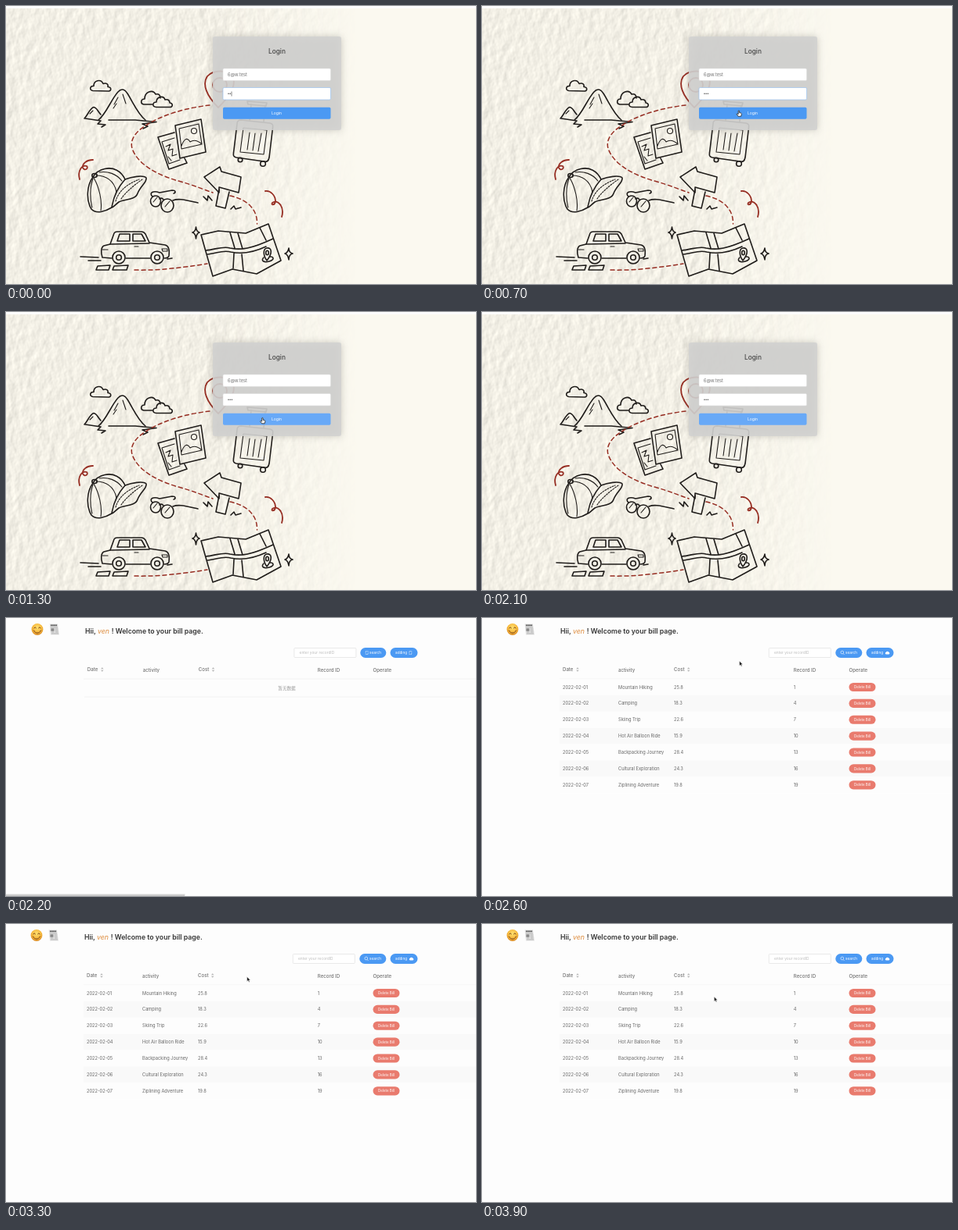
An HTML page for the animation above (4000 ms loop, 600 by 356 pixels).

```html
<!DOCTYPE html>
<html lang="en">
<head>
<meta charset="utf-8">
<title>Login and bill page</title>
<style>
html, body { margin: 0; width: 100%; height: 100%; overflow: hidden; background: #fdfdfd; }
svg { display: block; width: 600px; height: 356px; }
text { font-family: Inter, "Noto Sans", sans-serif; }
.ink { fill: none; stroke: #1f1c1a; stroke-width: 1.6; stroke-linecap: round; stroke-linejoin: round; }
.thin { stroke-width: 1.1; }
.red { stroke: #962d22; stroke-width: 1.8; }
.dash { stroke-dasharray: 5 4; stroke-width: 1.5; }
.field { fill: #fff; stroke: #dcdcdc; stroke-width: .6; }
.head { font-size: 6.1px; font-weight: 500; fill: #737373; }
.cell { font-size: 5.7px; fill: #666; }
.tiny { font-size: 4.7px; fill: #fff; }
.mid { text-anchor: middle; }
</style>
</head>
<body>
<svg viewBox="0 0 600 356" xmlns="http://www.w3.org/2000/svg">
<defs>
  <filter id="paper" x="0" y="0" width="100%" height="100%" color-interpolation-filters="sRGB">
    <feTurbulence type="fractalNoise" baseFrequency=".1 .075" numOctaves="3" seed="8"/>
    <feDiffuseLighting surfaceScale=".5" diffuseConstant="1.14" lighting-color="#f3f0e6">
      <feDistantLight azimuth="205" elevation="61"/>
    </feDiffuseLighting>
  </filter>
  <filter id="shade" x="-20%" y="-20%" width="140%" height="140%"><feGaussianBlur stdDeviation="5"/></filter>
  <linearGradient id="fade">
    <stop offset=".6" stop-color="#fff"/><stop offset="1" stop-color="#fff" stop-opacity="0"/>
  </linearGradient>
  <mask id="left"><rect width="450" height="356" fill="url(#fade)"/></mask>
  <radialGradient id="sun" cx=".5" cy=".35" r=".65">
    <stop offset="0" stop-color="#ffe273"/><stop offset=".6" stop-color="#f6b93e"/><stop offset="1" stop-color="#d98a25"/>
  </radialGradient>
</defs>

<g id="login">
  <rect width="600" height="356" fill="#fbf9f0"/>
  <g mask="url(#left)"><rect width="450" height="356" filter="url(#paper)"/></g>
  <rect width="600" height="3" fill="#fdfdfd"/>

  <g class="ink">
    <!-- clouds and mountains -->
    <path d="M111 108.500C106 108 107 102 112 102.500C112 95 121 93 124 99.500C128 98 131 100 130 103.500C135 104 135 109 130 109Z"/>
    <path d="M187 126H176C171 125 172 119 177 119C177 110 187 106 191 113C195 112 197 114 197 118"/>
    <path d="M192 129.500C186 129 187 123 192 123C192 116 201 114 203 120C207 119 209 121 209 124C214 125 213 130 208 129.500Z"/>
    <path d="M118 146C128 138 134 120 143 110C147 105.500 151 106 155 112C162 123 168 138 178 146"/>
    <path d="M100 144C105 139 107 131 112 129.500C116 130 117 135 121 139"/>
    <path d="M101 144L121 147L117 151L127 152L122 155M131 146L165 146L192 148.500L174 151L181 154L175 157"/>
    <path class="thin" d="M138 126L143 117M137 131L141 125M149 113L153 125M107 138L111 134"/>
    <!-- photos -->
    <path d="M215 162L194 168L208 209L231 201L228 195M216 153L249 145L255 187L222 195Z"/>
    <path class="thin" d="M215 169L199 174L208 202L222 197M221 157L246 151L250 177L224 183ZM224 179C227 171 231 167 235 174C238 172 243 171 249 176"/>
    <circle class="thin" cx="240" cy="160" r="3.500"/>
    <path class="thin" d="M204 180L210 177L207 185L213 183L212 192L218 190M207 193L211 198"/>
    <!-- suitcase -->
    <path d="M311 146L313 126M329 148L331 127M308 122L333 124L332 128L309 126Z"/>
    <path d="M300 146L337 150C341 151 341 153 340.500 156L336 194C335 199 333 200 329 199L294 194C290 193 290 191 290.500 188L295 151C295 148 297 146 300 146Z"/>
    <path class="thin" d="M303 156L333 159L329 190L299 187ZM311 162L308 184M318 163L315 185M326 163L322 186"/>
    <circle cx="299" cy="197" r="2.800"/><circle cx="328" cy="202" r="3.300"/>
    <!-- cap -->
    <path d="M111 219C103 230 102 249 109 260C115 267 127 263 135 258C137 245 143 232 152 222C147 211 137 206 126 208.500C119 210 114 214 111 219"/>
    <path d="M152 222C160 219 175 216 179 220C180 226 172 230 168 240C165 249 150 247 144 251C140 254 137 258 135 258"/>
    <path class="thin" d="M115 217C127 217 138 223 141 238M112 220C119 232 123 250 121 262M111 221C107 232 107 247 110 258M119 213C130 211 141 215 148 224"/>
    <path class="thin" stroke-dasharray="2 1.500" d="M140 250C143 239 152 229 170 222M147 247C152 239 164 229 174 222"/>
    <ellipse cx="113" cy="217" rx="3.200" ry="2.500"/>
    <!-- glasses -->
    <ellipse cx="191" cy="250" rx="6.500" ry="7"/><ellipse cx="206" cy="255.500" rx="8" ry="8.500"/>
    <path d="M196 247Q199 245 201 248M187 244C182 239 188 236 196 239L212 236C217 236 217 239 214 240M213 249C220 246 227 248 245 252"/>
    <path class="thin" d="M188 251L193 245M203 257L209 250"/>
    <!-- signpost -->
    <path d="M253 219L273 206L275 212L300 219L297 239L272 232L272 239Z"/>
    <path d="M272 235L268 256L280 259L285 238M252 244L257 249L258 243L263 249M287 260L291 256L293 260L300 258"/>
    <!-- car -->
    <path d="M135 323L123 322C121 316 121 309 125 307L133 305L138 291Q139 289 142 289L173 289Q176 289 178 292L183 303L203 306C208 307 209 312 208 320Q207 323 202 323M153 323H184"/>
    <path d="M133 305L183 304"/>
    <path d="M145 292H158V301H142ZM162 292H173L178 301H162Z"/>
    <circle cx="144" cy="322" r="8"/><circle cx="144" cy="322" r="3.300"/>
    <circle cx="193" cy="322" r="8"/><circle cx="193" cy="322" r="3.300"/>
    <path class="thin" d="M123 312H130M199 311H206V314H200ZM164 308H169"/>
    <path d="M95 321L118 322M105 326L121 326M206 324L212 323"/>
    <path d="M117 333L133 332L131 338L115 338ZM138 333L156 332L154 338L136 338Z"/>
    <!-- map -->
    <path d="M249 293L271 288L306 291L335 279L351 326L320 343L289 337L264 346Z"/>
    <path d="M255 313C267 312 277 307 286 310C300 313 313 311 341 298M257 318C268 317 277 312 287 315C301 318 315 316 332 308M286 290L292 310M296 291L302 311M291 317L290 336M301 318L303 339M324 284L332 300"/>
    <path d="M333 326C328 319 328 311 333 310C339 309 341 316 333 326"/>
    <ellipse cx="333.500" cy="316" rx="1.800" ry="2.800"/><path d="M329 322C325 326 329 329 336 327C343 325 342 321 337 321"/>
    <path d="M242.500 283Q243 289 247 290Q243 291 242.500 298Q242 291 238 290Q242 289 242.500 283ZM361 310Q361 316 366 317Q361 318 361 325Q360 318 356 317Q360 316 361 310Z"/>
    <!-- route -->
    <path class="red" d="M271 130C256 115 250 100 257 90C264 82 283 80 290 92C294 103 284 117 271 130M264 101a9 9 0 1 0 18 0a9 9 0 1 0-18 0"/>
    <path class="red dash" d="M260 127C232 130 200 139 180 152C163 162 157 174 162 185C170 204 195 217 220 224C238 229 250 234 264 239"/>
    <path class="red dash" d="M286 243C305 247 321 258 320.500 279"/>
    <path class="red dash" d="M164 338C195 339 225 335 257 330"/>
    <path class="red" d="M111 197C103 197 97 202 98 207C100 212 106 208 103 205C97 203 91 211 94 222"/>
    <path class="red" d="M331 237C338 236 344 243 344 250C343 256 338 255 340 252C346 247 356 256 352 270"/>
  </g>

  <rect x="264" y="39" width="164" height="120" rx="3" fill="#77756f" opacity=".36" filter="url(#shade)"/>
  <rect x="264" y="39" width="164" height="120" rx="3" fill="#d2d2d1" opacity=".88"/>
  <text class="mid" x="346" y="61" font-size="8.300" font-weight="500" fill="#464646">Login</text>
  <rect class="field" x="277" y="80" width="137.500" height="15.500" rx="1.500"/>
  <text x="283" y="89.700" font-size="5.700" fill="#747474">6@w.test</text>
  <rect class="field" id="pass" x="277" y="104.500" width="137.500" height="15.500" rx="1.500"/>
  <g fill="#555"><circle cx="284" cy="112.300" r=".8"/><circle cx="286.200" cy="112.300" r=".8"/><circle id="dot" cx="288.400" cy="112.300" r=".8"/></g>
  <path id="caret" d="M0 109.500V115.500" stroke="#333" stroke-width=".6"/>
  <rect id="go" x="277" y="129.700" width="137.500" height="15" rx="1.800"/>
  <text class="mid" x="345.500" y="139" font-size="5" fill="#fff">Login</text>
</g>

<g id="bill">
  <rect width="600" height="356" fill="#fdfdfd"/>
  <g id="top">
    <circle cx="39" cy="14.500" r="7.400" fill="url(#sun)"/>
    <path d="M34.500 16C36.500 20.300 41.500 20.300 43.500 16M34.800 12.800Q36.200 10.700 37.500 12.800M40.500 12.800Q41.800 10.700 43.200 12.800" fill="none" stroke="#7a4416" stroke-width="1" stroke-linecap="round"/>
    <path d="M54.500 7.500H65L67 21.500H56Z" fill="#e3e3e3"/>
    <path d="M56 9.300H64.500" stroke="#555" stroke-width="1.700" stroke-dasharray="1.700 .4"/>
    <path d="M56 12H65M61.500 14H65.300M61.500 16H65.500M57 18H60.500M57 20H66M62 18H65.700" stroke="#a6a6a6" stroke-width=".8"/>
    <rect x="56.400" y="13.300" width="4" height="3.500" fill="#888"/>
    <g font-size="8.750" font-weight="600" fill="#353535">
      <text x="100" y="19.700">Hii,</text>
      <text x="116" y="19.700" font-style="italic" font-weight="400" fill="#dd8a3a">ven</text>
      <text x="133.700" y="19.700">! Welcome to your bill page.</text>
    </g>
  </g>
  <g id="query">
    <rect class="field" x="366.300" y="38.500" width="79" height="12" rx="1"/>
    <text x="373" y="46.200" font-size="4.850" fill="#bcbcbc">enter your recordID</text>
  </g>
  <rect id="find" x="451.300" y="38" height="13" rx="6.500" fill="#4b99f3"/>
  <rect x="490.500" y="38" width="35" height="13" rx="6.500" fill="#4b99f3"/>
  <text class="tiny" x="464" y="46.100">search</text>
  <text class="tiny" x="497" y="46.100">adding</text>
  <g id="icons">
    <path d="M461.300 45.600L462.600 47" stroke="#fff" stroke-width=".6"/>
    <circle cx="459.800" cy="44" r="1.900" fill="none" stroke="#fff" stroke-width=".6"/>
    <path d="M515.800 46.500a1.400 1.400 0 0 1 0-2.700a1.900 1.900 0 0 1 3.500 0a1.400 1.400 0 0 1 0 2.700Z" fill="#fff"/>
  </g>
  <path id="boxes" d="M459.200 42.500h3v4h-3ZM514.800 42.500h3v4h-3Z" fill="none" stroke="#fff" stroke-width=".6" stroke-dasharray="1 .4"/>
  <g id="heads">
    <text class="head" x="103" y="68">Date</text>
    <text class="head" x="174" y="69">activity</text>
    <text class="head" x="245" y="68">Cost</text>
    <path d="M120.200 65.300h3.600l-1.800-2ZM120.200 66.700h3.600l-1.800 2ZM261.900 65.300h3.600l-1.800-2ZM261.900 66.700h3.600l-1.800 2Z" fill="#b5b5b5"/>
  </g>
  <text class="head" x="397.800" y="69">Record ID</text>
  <text class="head" x="468.600" y="69">Operate</text>
  <path d="M99 78H600" stroke="#efefef" stroke-width=".8"/>
  <g id="empty">
    <path d="M100 101H600" stroke="#efefef" stroke-width=".8"/>
    <text class="mid" lang="zh-CN" x="358.500" y="92" font-size="5.600" fill="#9a9a9a" style="font-family:'Noto Sans CJK SC','Noto Sans CJK',sans-serif">暂无数据</text>
    <rect y="353" width="229" height="3" rx="1" fill="#ececec"/>
    <rect y="354.200" width="228" height="1.800" fill="#c9c9c9"/>
  </g>
  <g id="rows"></g>
</g>

<path id="arrow" d="M0 0V6.200L1.500 4.900L2.500 7L3.600 6.500L2.600 4.500H4.500Z" fill="#222" stroke="#fff" stroke-width=".5"/>
<path id="hand" d="M-.8-3.200Q0-4 .6-3.200V-.8L2.600-.4Q3.600 0 3.300 1.200L2.700 3.800H-.9L-2.800 1.200Q-2.800 .2-1.900 .4L-.8 1.200Z" fill="#fff" stroke="#222" stroke-width=".8" stroke-linejoin="round"/>
</svg>
<script>
const LOOP = 4000, CUT = 2200, LOADED = 2400;
const $ = id => document.getElementById(id);
const show = (id, on) => $(id).setAttribute("display", on ? "inline" : "none");
const put = (id, x, y) => $(id).setAttribute("transform", `translate(${x} ${y})`);
const clamp = v => Math.max(0, Math.min(1, v));
const ease = (t, a, b) => { const k = clamp((t - a) / (b - a)); return k * k * (3 - 2 * k); };
const mix = (a, b, k) => a + (b - a) * k;

const bills = [
  ["Mountain Hiking", "25.8"], ["Camping", "18.3"], ["Skiing Trip", "22.6"],
  ["Hot Air Balloon Ride", "15.9"], ["Backpacking Journey", "28.4"],
  ["Cultural Exploration", "24.3"], ["Ziplining Adventure", "19.8"]
];
$("rows").innerHTML = bills.map(([name, cost], i) => {
  const y = 88.5 + i * 20.88;
  const cell = (x, s) => `<text class="cell" x="${x}" y="${y + 2}">${s}</text>`;
  return `<rect x="99" y="${y - 10.4}" width="501" height="20.8" fill="${i % 2 ? "#f9f9f9" : "#fdfdfd"}"/>`
    + cell(103, "2022-02-0" + (i + 1)) + cell(174, name) + cell(245, cost) + cell(397.8, 1 + 3 * i)
    + `<rect x="468.500" y="${y - 5.6}" width="34" height="11.2" rx="5.6" fill="#e97b6e"/>`
    + `<text class="mid" x="485.500" y="${y + 1.6}" font-size="4.500" fill="#fff">Delete Bill</text>`;
}).join("");

function draw(t) {
  const loaded = t >= LOADED;
  show("login", t < CUT);
  show("bill", t >= CUT);

  // typing, focus and hover on the form
  const typed = t >= 300;
  show("dot", typed);
  show("caret", t < 500);
  put("caret", typed ? 290.2 : 288, 0);
  $("pass").style.stroke = t < 1000 ? "#8dbdf2" : "#dcdcdc";
  const h = ease(t, 750, 950);
  $("go").setAttribute("fill", `rgb(${mix(75, 104, h)},${mix(153, 169, h)},${mix(243, 247, h)})`);
  const reach = ease(t, 350, 650), settle = ease(t, 700, 1300);
  show("hand", t >= 400 && t < 1800);
  put("hand", mix(338, 328, reach) - .5 * settle, mix(122, 137.5, reach) + 1.5 * settle);

  // page before and after its data arrives
  const dx = loaded ? 0 : 1;
  put("top", dx, 0);
  put("heads", dx * .8, 0);
  put("query", dx * 1.6, 0);
  $("find").setAttribute("x", 451.3 + dx);
  $("find").setAttribute("width", 34 - dx);
  show("empty", !loaded);
  show("boxes", !loaded);
  show("icons", loaded);
  show("rows", loaded);

  const up = ease(t, LOADED, 2750), down = ease(t, 2850, 3600);
  show("arrow", loaded);
  put("arrow", mix(328.5, 296.3, down), mix(mix(110, 20, up), 93, down));
}

function tick(now) {
  draw(now % LOOP);
  requestAnimationFrame(tick);
}
draw(0);
requestAnimationFrame(tick);
</script>
</body>
</html>
```
